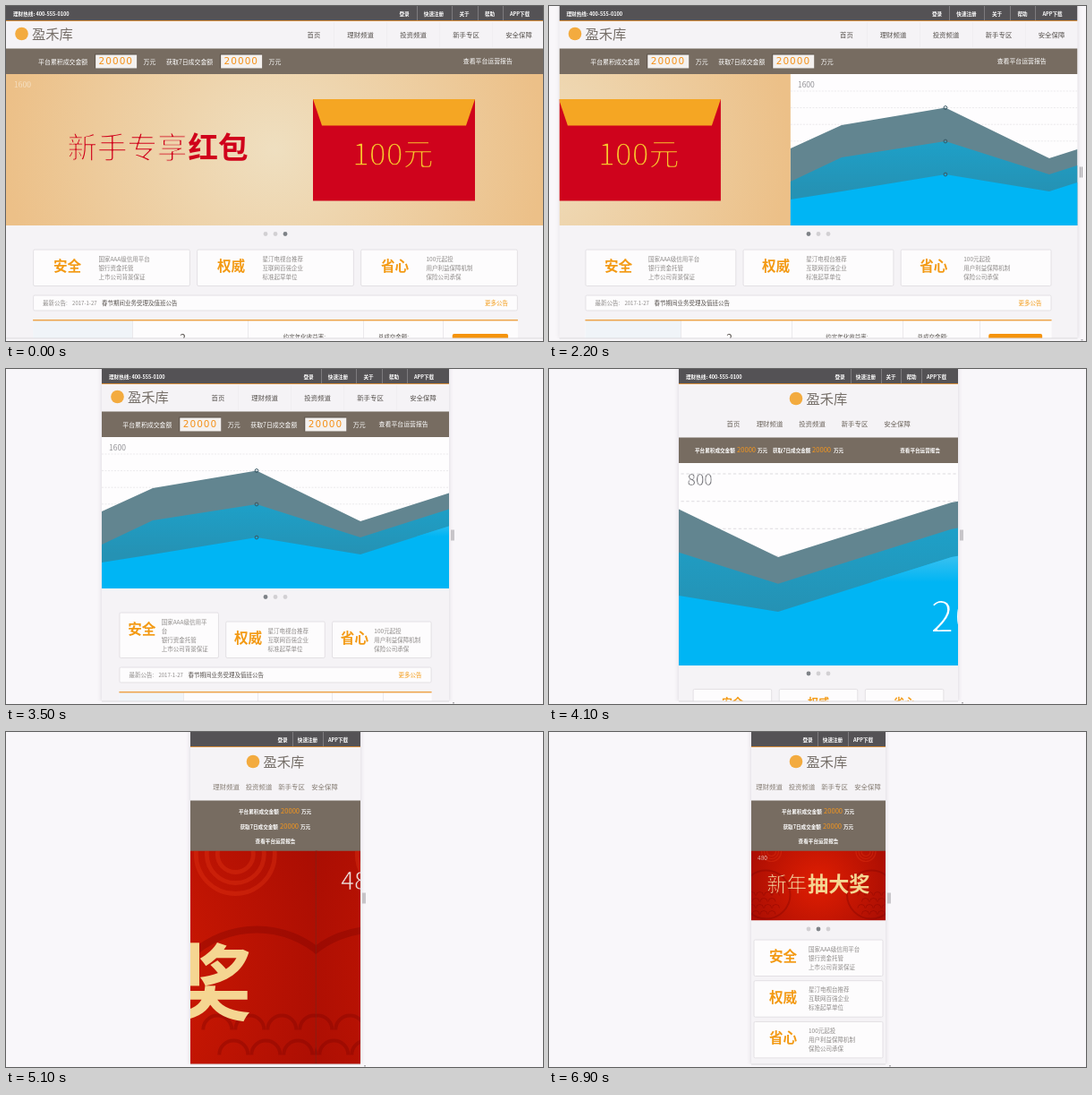
Animation, 600 px wide and 374 px high, one loop 7.1 s. Source, as an HTML page with a canvas:

```html
<!DOCTYPE html>
<html lang="zh-CN">
<head>
<meta charset="utf-8">
<style>
  html, body { margin: 0; width: 100%; height: 100%; overflow: hidden; background: #f9f7fa; }
  canvas { display: block; width: 600px; height: 374px; }
</style>
</head>
<body>
<canvas id="stage" width="600" height="374"></canvas>
<script>
const stage = document.getElementById('stage');
const ctx = stage.getContext('2d');
const layer = document.createElement('canvas').getContext('2d');
layer.canvas.width = 600;
layer.canvas.height = 374;

const LOOP = 7100, STEP = 100, MID = 301, FULL = 602, FLOOR = 371;
const FONT = '"Noto Sans CJK SC", "Noto Sans CJK", sans-serif';
const ORANGE = '#f39a14', BROWN = '#776c61', GREY = '#8d8a88', INK = '#55504c';

// viewport width over time: [ms, px]
const WIDTHS = [[1900, 602], [2100, 593], [2400, 551], [2600, 523], [3200, 431], [3500, 388],
  [4000, 326], [4100, 312], [4800, 224], [5100, 190], [5600, 160], [5800, 150]];
const TO_CHART = 2000, TO_PRIZE = 4800, SLIDE = 580, SETTLE = 5800;

const NAV = ['首页', '理财频道', '投资频道', '新手专区', '安全保障'];
const CARDS = [
  ['安全', '国家AAA级信用平台', '银行资金托管', '上市公司背景保证'],
  ['权威', '星汀电视台推荐', '互联网百强企业', '标准起草单位'],
  ['省心', '100元起投', '用户利益保障机制', '保险公司承保']
];
const STATS = ['平台累积成交金额', '获取7日成交金额'];
const REPORT = '查看平台运营报告';

function widthAt(t) {
  if (t <= WIDTHS[0][0]) return WIDTHS[0][1];
  for (let i = 1; i < WIDTHS.length; i++) {
    const [t0, w0] = WIDTHS[i - 1], [t1, w1] = WIDTHS[i];
    if (t <= t1) return w0 + (w1 - w0) * (t - t0) / (t1 - t0);
  }
  return 150;
}

function slideAt(t, start) {
  const p = Math.min(1, Math.max(0, (t - start) / SLIDE));
  return 1 - (1 - p) ** 2;
}

function rect(x, y, w, h, fill) {
  ctx.fillStyle = fill;
  ctx.fillRect(x, y, w, h);
}

function text(s, x, y, size, fill, { align = 'left', weight = 400, space = 0, font = FONT } = {}) {
  ctx.font = `${weight} ${size}px ${font}`;
  ctx.letterSpacing = space + 'px';
  ctx.textAlign = align;
  ctx.textBaseline = 'middle';
  ctx.fillStyle = fill;
  ctx.fillText(s, x, y);
}

const center = (s, x, y, size, fill, weight) => text(s, x, y, size, fill, { align: 'center', weight });

// hairline lettering: regular glyphs with their outline shaved off
function thin(s, x, y, size, fill, shave = .038) {
  layer.resetTransform();
  layer.clearRect(0, 0, 600, 374);
  layer.setTransform(ctx.getTransform());
  layer.font = `${size}px ${FONT}`;
  layer.textBaseline = 'middle';
  layer.lineJoin = 'round';
  layer.fillStyle = fill;
  layer.lineWidth = size * shave;
  layer.fillText(s, x, y);
  layer.globalCompositeOperation = 'destination-out';
  layer.strokeText(s, x, y);
  layer.globalCompositeOperation = 'source-over';
  ctx.save();
  ctx.resetTransform();
  ctx.drawImage(layer.canvas, 0, 0);
  ctx.restore();
}

function circle(x, y, r, fill) {
  ctx.beginPath();
  ctx.arc(x, y, r, 0, Math.PI * 2);
  ctx.fillStyle = fill;
  ctx.fill();
}

function ring(x, y, r, from = 0, to = Math.PI * 2) {
  ctx.beginPath();
  ctx.arc(x, y, r, from, to);
  ctx.stroke();
}

function poly(points, fill) {
  ctx.beginPath();
  points.forEach(([x, y]) => ctx.lineTo(x, y));
  ctx.closePath();
  ctx.fillStyle = fill;
  ctx.fill();
}

function panel(x, y, w, h) {
  ctx.beginPath();
  ctx.roundRect(x + .5, y + .5, w - 1, h - 1, 1.5);
  ctx.fillStyle = '#fdfcfd';
  ctx.fill();
  ctx.strokeStyle = '#e3e0e4';
  ctx.lineWidth = 1;
  ctx.stroke();
}

function gradient(y0, y1, from, to) {
  const g = ctx.createLinearGradient(0, y0, 0, y1);
  g.addColorStop(0, from);
  g.addColorStop(1, to);
  return g;
}

function glow(x, y, r, from, to) {
  const g = ctx.createRadialGradient(x, y, 0, x, y, r);
  g.addColorStop(0, from);
  g.addColorStop(1, to);
  return g;
}

function clipped(x, y, w, h, draw) {
  ctx.save();
  ctx.beginPath();
  ctx.rect(x, y, w, h);
  ctx.clip();
  draw();
  ctx.restore();
}

/* Slides, each drawn from its own top left corner */

function envelope() {
  rect(0, 0, FULL, 169, glow(300, 84, 300, '#efdfc0', '#ecc088'));
  thin('1600', 9, 11.5, 8.5, '#fbf3e6', .03);
  thin('新手专享', 68.5, 81, 33.5, '#d0021b');
  text('红包', 203.5, 81, 33.5, '#d0021b', { weight: 700 });
  rect(343, 28, 181, 113.5, '#cf031c');
  poly([[343, 28], [524, 28], [514, 57.5], [353, 57.5]], '#f5a623');
  thin('100元', 387, 89, 34, '#f7c52c');
}

function chartArea() {
  const xs = [0, 57, 173, 289, 405, 521, 610];
  const area = (ys, fill) => poly([...xs.map((x, i) => [x, ys[i]]), [610, 169], [0, 169]], fill);
  rect(0, 0, 610, 169, '#fefdfe');
  ctx.setLineDash([2, 1.5]);
  ctx.lineWidth = .6;
  ctx.strokeStyle = '#dddcdf';
  for (let y = 19; y < 100; y += 18.6) {
    ctx.beginPath();
    ctx.moveTo(0, y);
    ctx.lineTo(610, y);
    ctx.stroke();
  }
  ctx.setLineDash([]);
  area([83, 57, 37.5, 94, 57, 38, 24], '#628590');
  area([120, 93, 75, 112, 75, 56, 42], gradient(56, 130, '#1ba5cf', '#2592b4'));
  const front = [140, 131, 112, 131, 94, 75, 61];
  area(front, '#00b5f4');
  clipped(300, 0, 310, 111, () => area(front, gradient(74, 111, '#79cdea', '#00b5f4')));
}

function chart1600() {
  chartArea();
  ctx.lineWidth = 1;
  ctx.strokeStyle = '#3b5a66';
  for (const y of [37.5, 75, 112]) ring(173, y, 1.9);
  thin('1600', 8, 11.5, 8.5, '#75757a', .02);
  thin('2015年度报告', 412, 134.5, 28, '#fff');
}

function chart800() {
  ctx.save();
  ctx.translate(111 - 289 * 1.67, 105 - 94 * 1.65);
  ctx.scale(1.67, 1.65);
  chartArea();
  ctx.restore();
  thin('800', 9.5, 19, 17, '#66666b', .03);
  thin('2015年度报告', 281, 171, 48, '#fff');
}

// swirls above, a scaled round body below
function fish() {
  ctx.strokeStyle = 'rgba(235,60,25,.3)';
  ctx.lineWidth = 1.2;
  for (const r of [5, 8, 11]) ring(128, 1, r);
  ctx.strokeStyle = 'rgba(120,0,0,.32)';
  ctx.lineWidth = 2;
  ring(134, 49, 27);
  ctx.lineWidth = 1;
  for (let row = 0; row < 4; row++) {
    for (let i = 0; i < 4; i++) ring(123 + i * 9 + (row % 2) * 4.5, 50 + row * 7, 4, Math.PI, 0);
  }
}

function prize() {
  rect(0, 0, 151, 78, glow(75, 36, 86, '#e01e02', '#a80d03'));
  clipped(0, 0, 151, 78, () => {
    fish();
    ctx.translate(150.5, 0);
    ctx.scale(-1, 1);
    fish();
  });
  thin('480', 7, 8.3, 6.6, '#ecdcd8', .02);
  thin('新年', 17.5, 36.7, 22.3, '#f3d9a3', .03);
  text('抽大奖', 63, 36.7, 23.2, '#f5d692', { weight: 700 });
}

function place(draw, x, y, scale = 1) {
  ctx.save();
  ctx.translate(x, y);
  ctx.scale(scale, scale);
  draw();
  ctx.restore();
}

/* Page parts */

function topBar(x, w, mode) {
  const r = x + w;
  rect(x, 0, w, 16, '#545255');
  rect(x, 16, w, 1, '#d98f3c');
  if (mode < 2) text('理财热线: 400-555-0100', x + 8, 8.5, 5.6, '#fff', { weight: 700 });
  const links = [
    [['登录', 157], ['快速注册', 124], ['关于', 90], ['帮助', 61.5], ['APP下载', 28]],
    [['登录', 132], ['快速注册', 103], ['关于', 75], ['帮助', 52], ['APP下载', 24]],
    [['登录', 87], ['快速注册', 59], ['APP下载', 25]]
  ][mode];
  const bars = [[143.5, 104.5, 75.5, 47.5], [120, 86, 64, 41], [76, 42]][mode];
  links.forEach(([s, dx]) => center(s, r - dx, 8.5, 5.6, '#fff', 700));
  bars.forEach(dx => rect(Math.round(r - dx), 0, 1, 16, '#7d7b7e'));
}

function logo(x, y) {
  circle(x, y, 7.3, '#f3ab3f');
  text('盈禾库', x + 11.5, y - .3, 15.3, '#77706a', { weight: 500 });
}

function header(x, w, mode) {
  if (mode === 0) {
    logo(x + 17.5, 31);
    [258, 206, 147, 88, 29].forEach((dx, i) => {
      center(NAV[i], x + w - dx, 32.5, 7.4, INK);
      if (i) rect(Math.round(x + w - dx - 30), 18, 1, 28, '#f0eef1');
    });
    return;
  }
  logo(276, 33);
  const xs = mode === 1 ? [206, 246.5, 294, 341.5, 389] : [0, 246, 282.5, 319, 356];
  for (let i = mode - 1; i < 5; i++) center(NAV[i], xs[i], 61.5, 7.4, mode === 1 ? '#6b635b' : '#857c73');
}

function stat(x, y, label, numX, unitX) {
  text(label, x, y, 5.6, '#fff', { weight: 700 });
  text('20000', numX, y - .5, 7.6, '#f5961d');
  text('万元', unitX, y, 5.6, '#fff', { weight: 700 });
}

function statBar(x, w, mode) {
  const r = x + w;
  if (mode === 0) {
    const pad = x + w * .06;
    rect(x, 47.5, w, 28.5, BROWN);
    STATS.forEach((label, i) => {
      const bx = pad + 63 + i * 140;
      text(label, pad + i * 143, 62, 6.9, '#fff');
      rect(bx, 53.5, 47, 16, '#5d534a');
      rect(bx + 1, 54.5, 46, 15, '#f4f1ef');
      text('20000', bx + 4.5, 62, 10.5, '#f5921b', { space: 1, font: '"DejaVu Sans", sans-serif' });
      text('万元', bx + 54.5, 62, 6.9, '#fff');
    });
    text(REPORT, r - w * .06, 61.5, 6.9, '#fff', { align: 'right' });
  } else if (mode === 1) {
    rect(x, 76.5, w, 28.5, BROWN);
    stat(x + 18, 91, STATS[0], x + 65, x + 88);
    stat(x + 105, 91, STATS[1], x + 149, x + 173);
    text(REPORT, r - 20, 90.5, 5.6, '#fff', { align: 'right', weight: 700 });
  } else {
    rect(x, 76.5, w, 56.5, BROWN);
    stat(260, 88.5, STATS[0], 307, 330);
    stat(261.5, 105.5, STATS[1], 306, 329);
    center(REPORT, 301, 122, 5.6, '#fff', 700);
  }
}

function dots(y, active) {
  for (let i = 0; i < 3; i++) circle(290 + i * 11, y, 2.4, i === active ? '#7e8287' : '#d2d0d3');
}

function carousel(t, x, w, mode) {
  if (mode === 0) {
    const shift = slideAt(t, TO_CHART) * FULL;
    clipped(x, 76, w, 169, () => {
      if (shift < FULL) place(envelope, x - shift, 76);
      if (shift > 0) place(chart1600, x + FULL - shift, 76);
    });
    dots(254.5, t < TO_CHART ? 2 : 0);
  } else if (mode === 1) {
    clipped(x, 105, w, 226, () => place(chart800, x, 105));
    dots(340, 0);
  } else if (t < SETTLE) {
    const left = x - slideAt(t, TO_PRIZE) * FULL;
    clipped(x, 132.5, w, FLOOR - 132.5, () => {
      place(prize, left, 132.5, 4);
      place(prize, left + FULL, 132.5, 4);
      rect(left + FULL - .5, 132, 1, 240, 'rgba(110,45,30,.5)');
    });
  } else {
    clipped(x, 132.5, w, 78, () => place(prize, x, 132.5));
    dots(220, 1);
  }
}

function card([title, ...lines], x, y, w, h, titleX, listX) {
  panel(x, y, w, h);
  text(title, titleX, y + 18.5, 15.6, ORANGE, { weight: 700 });
  lines.forEach((s, i) => text(s, listX, y + 10.7 + i * 10, 6.5, GREY));
}

function wideBody(x, w) {
  const left = x + w * .05, inner = w * .9, right = left + inner;
  const cw = (inner - 14.5) / 3, drop = w < 410 ? 10 : 0;
  CARDS.forEach((c, i) => {
    const cx = left + i * (cw + 7.25);
    const wrap = drop && i === 0;
    const lines = wrap ? [c[0], c[1].slice(0, -1), c[1].slice(-1), ...c.slice(2)] : c;
    card(lines, cx, wrap ? 271.5 : 271.5 + drop, cw, wrap ? 51.5 : 41.5,
      cx + cw * .204 - 13, cx + cw * .406 + 2);
  });

  const y = 331.5 + drop;
  panel(left, y - 9, inner, 18);
  text('最新公告:', left + 11, y, 6.5, GREY);
  text('2017-1-27', left + 44, y, 6, GREY);
  text('春节期间业务受理及值班公告', left + 77, y, 6.5, INK);
  text('更多公告', right - 11, y, 6.5, ORANGE, { align: 'right' });

  const top = 351 + drop;
  rect(left, top, inner, FLOOR - top, '#fdfcfd');
  rect(left, top, inner * .205, FLOOR - top, '#f0f4f8');
  [.205, .443, .681, .845].forEach(k => rect(Math.round(left + inner * k), top, 1, 30, '#ebe9ec'));
  rect(left, top - 1, inner, 1.5, '#eda54c');
  text('2', left + inner * .303, 370 + drop, 12, INK);
  text('约定年化收益率:', left + inner * .516, 369.5 + drop, 6.5, INK);
  text('总成交金额:', left + inner * .712, 369.5 + drop, 6.5, INK);
  ctx.beginPath();
  ctx.roundRect(left + inner * .865, 366 + drop, inner * .115, 12, 2);
  ctx.fillStyle = '#f5930c';
  ctx.fill();
}

function mediumBody(x, w) {
  const left = x + w * .05, cw = (w * .9 - 15) / 3;
  CARDS.forEach(([title], i) => {
    const cx = left + i * (cw + 7.5);
    panel(cx, 357, cw, 40);
    center(title, cx + cw / 2, 372.5, 12, ORANGE, 700);
  });
}

function narrowBody(x, w) {
  CARDS.forEach((c, i) => card(c, x + 2.5, 231.5 + i * 45.7, w - 5, 41.5, x + 20, x + 64));
}

function backdrop(x, w) {
  rect(0, 0, 600, 374, '#f9f7fa');
  ctx.save();
  ctx.shadowColor = 'rgba(70,60,80,.18)';
  ctx.shadowBlur = 5;
  rect(x, -5, w, FLOOR + 5, '#f5f3f6');
  ctx.restore();
}

function edges(x, w, t) {
  const r = x + w;
  rect(0, FLOOR, 600, 4, '#f9f7fa');
  rect(x, FLOOR - .5, w, w === FULL && t >= 900 ? 4 : 1, '#dcdadd');
  rect(r + 2.5, 179.5, 1, 12, '#98969a');
  rect(r + 4.5, 179.5, 1, 12, '#98969a');
  rect(r + 4, 372, 2, 1.5, '#b0aeb2');
}

function draw(t) {
  const w = widthAt(t), x = MID - w / 2;
  const mode = w > 365 ? 0 : w > 225 ? 1 : 2;
  backdrop(x, w);
  clipped(x, 0, w, FLOOR, () => {
    topBar(x, w, mode);
    header(x, w, mode);
    statBar(x, w, mode);
    carousel(t, x, w, mode);
    if (mode === 0) wideBody(x, w);
    else if (mode === 1) mediumBody(x, w);
    else if (t >= SETTLE) narrowBody(x, w);
  });
  edges(x, w, t);
}

const start = performance.now();
function tick() {
  const t = (performance.now() - start) % LOOP;
  draw(Math.floor(t / STEP) * STEP);
  requestAnimationFrame(tick);
}
tick();
</script>
</body>
</html>
```
